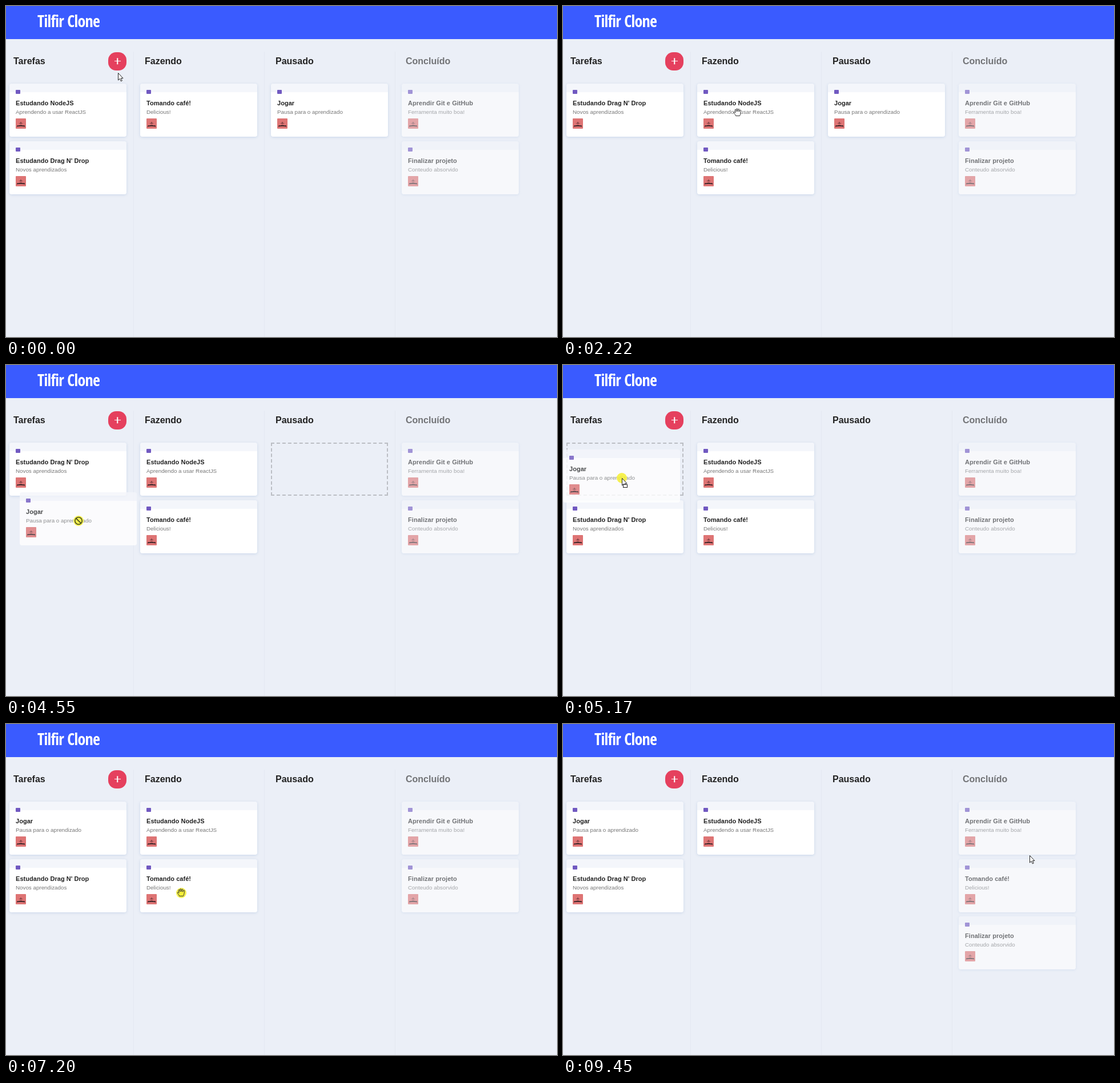
Animation of 965 by 580 pixels, one loop 9.89 s. Source, as an HTML page:

```html
<!DOCTYPE html>
<html lang="pt">
<head>
<meta charset="utf-8">
<title>Quadro de tarefas</title>
<style>
  html, body { margin: 0; width: 100%; height: 100%; overflow: hidden; background: #ebeff7; }
  body { position: relative; font-family: "Liberation Sans", Arial, sans-serif; color: #222; }
  body > *, .card > * { position: absolute; white-space: nowrap; }
  header { left: 0; top: 0; width: 100%; height: 58px; background: #3a5bff; }
  h1 {
    position: absolute; left: 55px; top: 6px; margin: 0; color: #fff;
    font: bold 28px/40px "Open Sans Condensed", "Liberation Sans Narrow", "Open Sans", sans-serif;
    font-stretch: 75%; letter-spacing: -.7px;
  }
  h2 { top: 87px; margin: 0; font-size: 16px; line-height: 20px; }
  .line { top: 80px; bottom: 0; width: 1px; background: #e4e8f1; }
  .add { left: 179px; top: 81px; width: 32px; height: 32px; border-radius: 14px; background: #e5405e; }
  .add::before, .add::after {
    content: ""; position: absolute; left: 10.5px; top: 14.75px; width: 11px; height: 1.5px; background: #fff;
  }
  .add::after { transform: rotate(90deg); }
  .card {
    left: 0; top: 0; width: 205px; height: 93px; border-radius: 4px;
    background: linear-gradient(#f4f6fb 15px, #fff 15px);
    box-shadow: 0 1px 4px rgba(192, 208, 230, .8);
  }
  .card i { left: 11px; top: 11px; width: 8px; height: 7px; border-radius: 1px; background: #7159c1; }
  .card b { left: 11px; top: 27px; font-size: 11px; line-height: 14px; letter-spacing: .05px; }
  .card span { left: 11px; top: 44px; font-size: 9.8px; line-height: 12px; color: #777; }
  .card svg { left: 11px; top: 61px; }
  .done { opacity: .6; }
  .empty { background: none; box-shadow: none; border: 2px dashed rgba(0, 0, 0, .2); border-radius: 0; box-sizing: border-box; }
  .empty > * { visibility: hidden; }
  .drag { opacity: .8; box-shadow: none; }
  #cursor { left: 0; top: 0; overflow: visible; }
</style>
</head>
<body>
<header><h1>Tilfir Clone</h1></header>
<h2 style="left:13px">Tarefas</h2>
<h2 style="left:243px">Fazendo</h2>
<h2 style="left:472px">Pausado</h2>
<h2 class="done" style="left:700px">Concluído</h2>
<div class="line" style="left:223px"></div>
<div class="line" style="left:452px"></div>
<div class="line" style="left:681px"></div>
<div class="add"></div>
<svg id="cursor" width="1" height="1">
  <circle id="press" r="9" fill="#f5ef38" opacity=".88"/>
  <g id="arrow" fill="#fff" stroke="#222">
    <path d="M.5.5V13L3.3 10.3 5.3 14.8 7.3 13.9 5.4 9.6H9Z"/>
    <rect id="box" x="2.5" y="11.5" width="7" height="5"/>
  </g>
  <path id="hand" stroke="#333" stroke-linejoin="round"
    d="M-3.5 5.5C-4 3-6.5 1.5-6.8-.7-6.5-2-5-1.5-4 .2L-5-4.5C-5-6-3.3-6-3-4.7L-2.2-2-2.3-6.2C-2.2-7.6-.4-7.6-.2-6.2L.1-2.2.9-6C1.3-7.2 3-6.8 2.8-5.4L2.5-1.8 4-4.2C4.8-5.2 6.2-4.6 5.8-3.2 5 0 5 3 3.5 5.5Z"/>
  <g id="stop" fill="none" stroke="#444a20" stroke-width="1.5">
    <circle r="6.2"/><path d="M-4.4-4.4 4.4 4.4"/>
  </g>
</svg>
<script>
const LOOP = 9890, CARD_W = 205, CARD_H = 93;
const $ = id => document.getElementById(id);

const texts = {
  node: ["Estudando NodeJS", "Aprendendo a usar ReactJS"],
  drop: ["Estudando Drag N' Drop", "Novos aprendizados"],
  cafe: ["Tomando café!", "Delicious!"],
  play: ["Jogar", "Pausa para o aprendizado"],
  git: ["Aprendir Git e GitHub", "Ferramenta muito boa!"],
  end: ["Finalizar projeto", "Conteudo absorvido"]
};

const board = [["node", "drop"], ["cafe"], ["play"], ["git", "end"]];

// Each card is pressed, enters a new column and row, and is released
const moves = [
  { id: "node", press: 990, enter: 1620, col: 1, row: 0, release: 1980 },
  { id: "play", press: 3700, enter: 4920, col: 0, row: 0, release: 5280 },
  { id: "cafe", press: 7110, enter: 8630, col: 3, row: 1, release: 9020 }
];
const LIFT = 115, LEAVE = 240, LINGER = 160;

// Pointer strokes: start, end, x, y
const strokes = [
  [30, 31, 151, 131], [180, 680, 98, 184], [880, 990, 101, 191],
  [1000, 1470, 266, 170], [1620, 1860, 306, 187],
  [2400, 3200, 638, 195], [3200, 3700, 567, 186],
  [3810, 4550, 127, 273], [4670, 5040, 103, 198],
  [5600, 6290, 213, 289], [6390, 7110, 307, 296],
  [7350, 7590, 506, 304], [8050, 8190, 567, 272], [8340, 8490, 707, 261], [8630, 9020, 817, 230]
];

function makeCard([title, note]) {
  const el = document.createElement("div");
  el.className = "card";
  el.innerHTML = `<i></i><b>${title}</b><span>${note}</span>
    <svg width="18" height="18"><rect width="18" height="18" rx="1" fill="#de7474"/>
    <path d="M1.5 14.5Q3 11 5 12.5 9 10.5 13 12.5 15.5 11 16.5 14.5 9 13 1.5 14.5Z" fill="#3a2528"/>
    <path d="M5 8.5 7.5 8 9 5.5 10.5 8 13 8.5 9 9.8Z" fill="#864548"/></svg>`;
  document.body.insertBefore(el, $("cursor"));
  return el;
}

const cards = {};
for (const id in texts) cards[id] = makeCard(texts[id]);
for (const m of moves) {
  m.ghost = makeCard(texts[m.id]);
  m.ghost.classList.add("drag");
}

const place = (el, x, y) => el.style.transform = `translate(${x}px,${y}px)`;
const show = (el, on) => el.style.display = on ? "" : "none";
const slot = (col, row) => [6 + 229 * col, Math.round(136 + 100.7 * row)];
const easeOut = k => k * (2 - k);

function pointer(t) {
  let x = 196, y = 117;
  for (const [from, to, tx, ty] of strokes) {
    const k = easeOut(Math.min(1, Math.max(0, (t - from) / (to - from))));
    x += (tx - x) * k;
    y += (ty - y) * k;
  }
  return [Math.round(x), Math.round(y)];
}

function columns(t) {
  const cols = board.map(c => [...c]);
  for (const m of moves) {
    if (t < m.enter) break;
    const from = cols.find(c => c.includes(m.id));
    from.splice(from.indexOf(m.id), 1);
    cols[m.col].splice(m.row, 0, m.id);
  }
  return cols;
}

// Distance from a card's corner to the point where it is grabbed
for (const m of moves) {
  const cols = columns(m.press);
  const col = cols.findIndex(c => c.includes(m.id));
  const [x, y] = slot(col, cols[col].indexOf(m.id));
  const [px, py] = pointer(m.press);
  m.grip = [px - x, py - y];
}

function draw(t) {
  const [mx, my] = pointer(t);
  const held = moves.find(m => t >= m.press && t < m.release);
  const moving = !!held && t >= held.press + LIFT;
  const vacant = held && t >= held.press + LEAVE ? held.id : null;

  let over = false;
  columns(t).forEach((ids, col) => ids.forEach((id, row) => {
    const [x, y] = slot(col, row);
    place(cards[id], x, y);
    cards[id].classList.toggle("done", col === 3);
    cards[id].classList.toggle("empty", id === vacant);
    if (mx >= x && mx <= x + CARD_W && my >= y && my <= y + CARD_H) over = true;
  }));

  for (const m of moves) {
    show(m.ghost, t >= m.press + LIFT && t < m.release + LINGER);
    place(m.ghost, mx - m.grip[0], my - m.grip[1]);
  }

  place($("cursor"), mx, my);
  show($("press"), held);
  show($("arrow"), moving === over);
  show($("box"), moving);
  show($("hand"), over && !moving);
  $("hand").setAttribute("fill", held ? "#f5ef38" : "#fff");
  show($("stop"), moving && !over);
}

const start = performance.now();
function frame() {
  draw(Math.max(0, performance.now() - start) % LOOP);
  requestAnimationFrame(frame);
}
frame();
</script>
</body>
</html>
```
